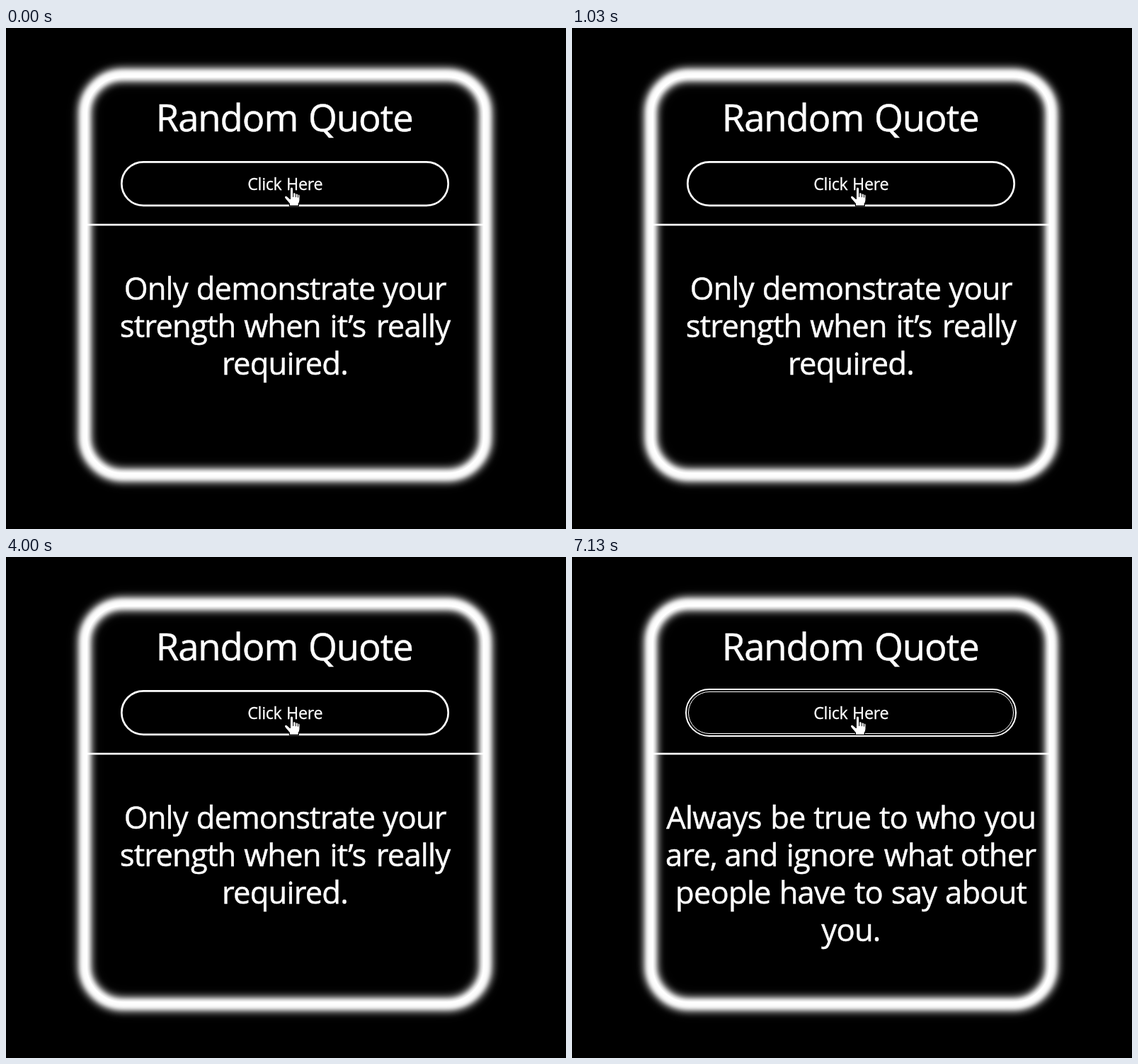
An HTML page for the animation above (8000 ms loop, 791x708 px).

```html
<!DOCTYPE html>
<html lang="en">
<head>
<meta charset="utf-8">
<title>Random Quote</title>
<style>
  html, body { margin: 0; width: 100%; height: 100%; overflow: hidden; background: #000; }
  svg { display: block; width: 100%; height: 100%; }
  text { font-family: "Open Sans", "Noto Sans", sans-serif; fill: #fff; stroke: #fff; text-anchor: middle; }
  .title { font-size: 52.5px; letter-spacing: -1px; stroke-width: 0.5px; }
  .label { font-size: 23.3px; letter-spacing: -0.3px; stroke-width: 0.3px; }
  .quote { font-size: 43.5px; letter-spacing: -0.8px; stroke-width: 0.5px; }
  .outline { fill: none; stroke: #fff; }
</style>
</head>
<body>
<svg viewBox="0 0 791 708" xmlns="http://www.w3.org/2000/svg">
  <defs>
    <filter id="core" filterUnits="userSpaceOnUse" x="0" y="0" width="791" height="708" color-interpolation-filters="sRGB">
      <feGaussianBlur stdDeviation="3"/>
    </filter>
    <filter id="soft" filterUnits="userSpaceOnUse" x="0" y="0" width="791" height="708" color-interpolation-filters="sRGB">
      <feGaussianBlur stdDeviation="5.5"/>
    </filter>
    <filter id="wide" filterUnits="userSpaceOnUse" x="0" y="0" width="791" height="708" color-interpolation-filters="sRGB">
      <feGaussianBlur stdDeviation="10"/>
    </filter>
    <rect id="glow" x="111.2" y="66.2" width="566.2" height="565.8" rx="54"/>
  </defs>
  <rect width="791" height="708"/>
  <use href="#glow" class="outline" stroke-width="16" opacity="0.15" filter="url(#wide)"/>
  <use href="#glow" class="outline" stroke-width="18" filter="url(#soft)"/>
  <use href="#glow" class="outline" stroke-width="10" filter="url(#core)"/>
  <rect class="outline" x="113.3" y="68.3" width="562" height="561.6" rx="52" stroke-width="2.7"/>
  <rect x="114" y="276.7" width="561" height="2.7" fill="#fff"/>

  <g id="heading"></g>

  <rect id="idle" class="outline" x="163.3" y="189.3" width="461.4" height="61.6" rx="30.8" stroke-width="2.7"/>
  <g id="focused" class="outline">
    <rect x="161" y="187" width="466" height="66" rx="33" stroke-width="2"/>
    <rect x="164.5" y="190.5" width="459" height="59" rx="29.5" stroke-width="1"/>
  </g>
  <g id="label"></g>

  <g id="first"></g>
  <g id="second"></g>

  <g stroke="#000" stroke-linejoin="round" stroke-linecap="round">
    <path fill="#fff" stroke-width="1.3" d="M401.3 227.2 q0-2.4 2.2-2.4 t2.2 2.4 V233
      q3-.9 3.6 1 q2.2-.8 3.1 1 q2.7-.4 2.7 2.2 V243 q0 3-1.8 5.4 V251.4 H400.4 V248.4
      L394.4 241.4 q-2-2.6-.4-3.9 q1.8-1.2 3.8.8 L401.3 241.4 Z"/>
    <path fill="none" stroke-width="1" d="M405.7 233 V238.5 M409.3 234 V238.8 M412.4 235 V239.2"/>
  </g>
</svg>
<script>
  const LOOP = 8000, CLICK = 5970;
  const $ = id => document.getElementById(id);

  // Each line is a list of [word, centre] pairs.
  function write(id, style, top, step, lines) {
    lines.forEach((line, row) => line.forEach(([word, x]) => {
      const t = document.createElementNS("http://www.w3.org/2000/svg", "text");
      t.setAttribute("class", style);
      t.setAttribute("x", x);
      t.setAttribute("y", top + row * step);
      t.textContent = word;
      $(id).append(t);
    }));
  }

  write("heading", "title", 146, 0, [[["Random", 312], ["Quote", 500.8]]]);
  write("label", "label", 229, 0, [[["Click", 365.3], ["Here", 421.7]]]);
  write("first", "quote", 384, 53, [
    [["Only", 211.8], ["demonstrate", 395], ["your", 577]],
    [["strength", 242.6], ["when", 390.5], ["it’s", 483], ["really", 575]],
    [["required.", 394]]
  ]);
  write("second", "quote", 384, 53, [
    [["Always", 200.5], ["be", 305], ["true", 381.8], ["to", 454], ["who", 528.2], ["you", 618.8]],
    [["are,", 168.4], ["and", 253], ["ignore", 365], ["what", 489.2], ["other", 602]],
    [["people", 213.4], ["have", 339.6], ["to", 419], ["say", 483], ["about", 584.6]],
    [["you.", 394]]
  ]);

  function show(id, on) {
    $(id).setAttribute("visibility", on ? "visible" : "hidden");
  }

  function draw(ms) {
    const clicked = ms % LOOP >= CLICK;
    show("idle", !clicked);
    show("first", !clicked);
    show("focused", clicked);
    show("second", clicked);
  }

  const start = performance.now();
  function tick() {
    draw(performance.now() - start);
    requestAnimationFrame(tick);
  }
  tick();
</script>
</body>
</html>
```
